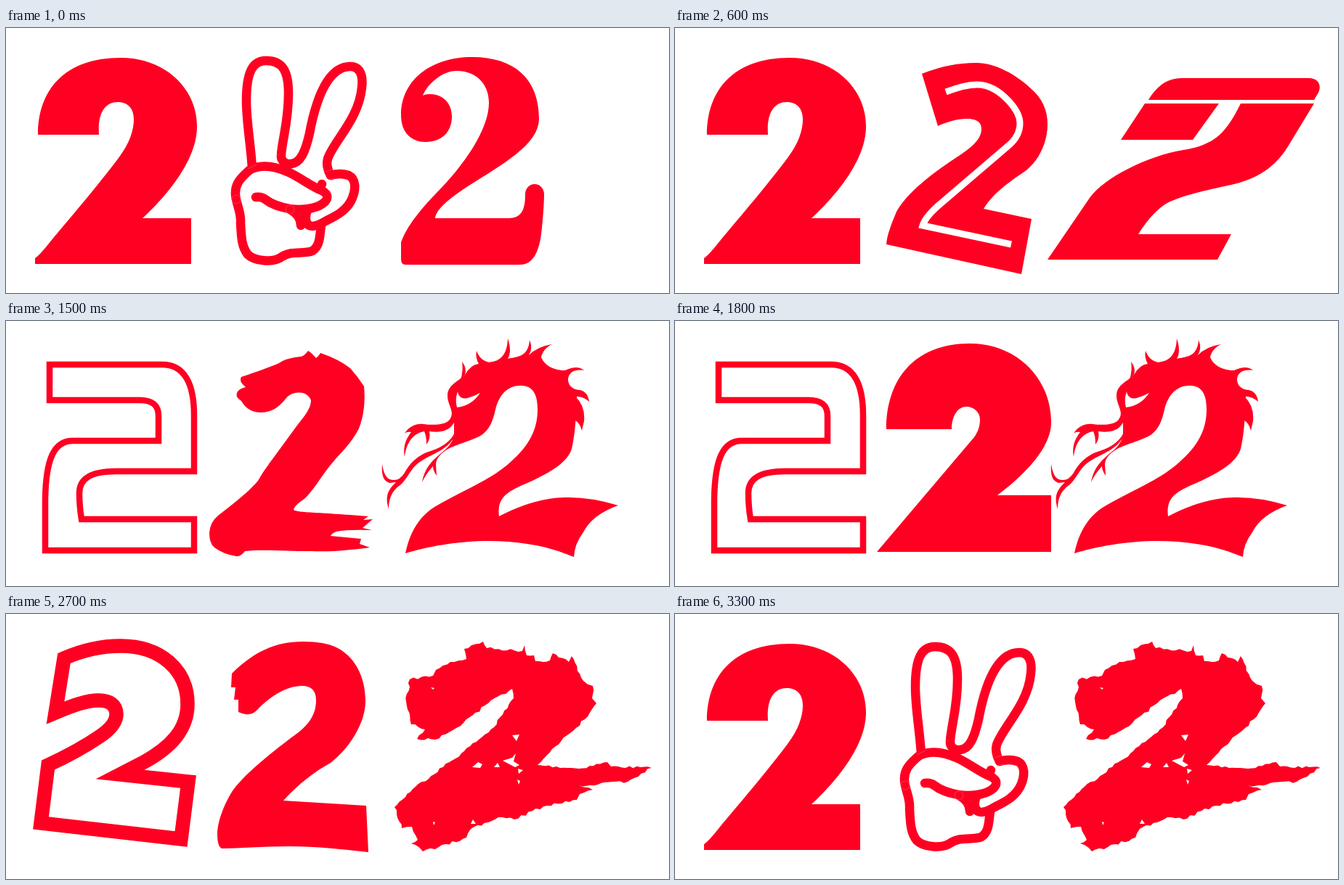
An HTML page that plays this animation: 913 by 365 pixels, repeating every 3.6 s.

```html
<!DOCTYPE html>
<html lang="en">
<head>
<meta charset="utf-8">
<title>2 2 2</title>
<style>
  html, body { margin: 0; width: 100%; height: 100%; overflow: hidden; background: #fff; }
  svg { display: block; width: 100%; height: 100%; fill: #ff0022; }
  .line { fill: none; stroke: #ff0022; }
  .gap { fill: #fff; }
  .gap-line { fill: none; stroke: #fff; }
  [data-from] { visibility: hidden; }
</style>
</head>
<body>
<svg viewBox="0 0 913 365">
  <!-- Left digit -->
  <g data-from="3000" data-for="1500">
    <path d="M44 147C44 86 80 41 158 41C218 41 263 82 263 136C263 175 233 220 188 262H255V325H40V317C48 312 60 295 72 281C100 248 130 212 155 179C170 159 176 141 176 126C176 111 168 102 154 102C137 102 126 116 128 147Z"/>
  </g>
  <g data-from="900" data-for="1200">
    <path class="line" stroke-width="8.5" d="M60 60H215C245 60 259 85 259 130V207H152C115 207 101 218 101 237Q101 255 104 273H259V316H54V245C55 190 66 165 92 165H210V131C210 116 202 109 184 109H60Z"/>
  </g>
  <g data-from="2100" data-for="900">
    <path class="line" stroke-width="19.5" d="M80 61C112 47 138 44 158 44C213 44 250 77 250 124C250 160 226 184 190 204L157 221L251 231L241 310L48 288L58 208C82 197 108 183 130 168C146 157 152 148 152 138C152 125 142 119 128 119C110 119 92 126 68 136Z"/>
  </g>

  <!-- Middle digit -->
  <g data-from="3300" data-for="600">
    <g class="line" stroke-width="12.5" stroke-linecap="round" stroke-linejoin="round">
      <path class="fingers" d="M339 193C337 160 331 130 331 100C331 60 340 45 358 45C380 45 389 58 389 90C389 130 380 155 379 175C378 184 386 188 393 187C405 186 412 172 418 145C425 108 440 53 474 53C488 53 492 66 490 82C486 125 452 155 443 180Q440 190 447 203"/>
      <path class="thumb" d="M447 203Q460 199 472 203C482 208 482 222 477 234C470 252 452 260 440 266C425 275 415 276 413 264Q412 256 416 250"/>
      <path class="palm" d="M317 236C312 215 325 205 335 196C350 187 370 190 390 199C405 206 420 218 435 224C445 229 444 236 436 242C425 250 405 251 390 249C375 246 366 243 357 236Q352 232 344 233M435 215L433 220M391 250Q406 258 406 272"/>
      <path class="wrist" d="M317 236C320 250 324 256 323 268C324 290 325 302 333 312C342 321 368 324 380 315C393 306 410 312 422 307C433 300 432 285 434 272"/>
    </g>
    <path class="gap-line" stroke-width=".6" opacity=".35" d="M333 194L345 188M440 198L452 194M440 209L453 207M311 236a6 6 0 1 0 12 0a6 6 0 1 0-12 0M385 250a6 6 0 1 0 12 0a6 6 0 1 0-12 0"/>
  </g>
  <g data-from="300" data-for="900">
    <path d="M340 63C365 53 390 48 415 48C440 48 470 63 495 88C507 100 513 115 513 133C513 155 503 180 485 195C470 206 440 224 425 249L491 263L477 339L291 298C292 285 298 270 305 253C320 226 355 200 385 180C405 167 422 155 422 139C422 128 413 125 401 125C390 125 375 129 362 135Z"/>
    <path class="gap-line" stroke-width="9" d="M373 88C390 82 402 78 416 78C432 78 447 87 460 101C470 112 475 121 475 131C475 145 468 155 458 163L368 240Q345 259 341 272L463 298"/>
  </g>
  <g data-from="1200" data-for="600">
    <path class="brush-top" d="M330 91Q320 83 324 77C345 70 365 63 376 58C388 50 400 50 406 49Q411 48 416 41Q421 44 427 51Q431 48 433 44Q459 53 474 65Q484 76 493 90C495 110 493 130 486 148C475 170 460 182 447 198L362 197L400 145C412 130 420 120 420 109C414 94 393 97 386 106C375 120 365 126 351 126Q333 126 324 110Q314 104 319 97Q322 93 330 91Z"/>
    <path class="brush-foot" d="M452 192L447 198C435 213 422 235 411 245Q397 254 396 260C400 264 425 263 499 269L492 274L505 273L491 285L504 288Q470 287 455 290Q449 292 447 296L489 300L487 307L501 312C470 316 450 318 420 317C390 317 350 314 329 317Q323 325 317 324Q299 321 287 312Q280 306 280 292Q281 277 292 268C310 254 335 235 347 220Q353 209 362 197L366 192Z"/>
  </g>
  <g data-from="1800" data-for="600">
    <path d="M291 149C291 80 330 31 406 31C470 31 518 78 518 140C518 170 490 205 444 240H518V318H278L412 160C418 152 420 143 420 136C420 125 411 118 401 118C390 118 381 130 381 149Z"/>
  </g>
  <g data-from="2400" data-for="900">
    <path d="M311 82C340 53 370 38 409 38Q439 38 455 46C483 60 495 90 495 120C495 150 473 185 447 205C425 217 403 234 382 257L496 264L499 328C460 324 430 320 390 320C350 320 320 323 297 323Q291 320 291 303C291 290 297 268 311 245C325 224 360 195 396 168C415 155 427 140 427 119C427 105 420 99 408 99C385 99 362 115 345 133C338 140 329 139 320 135V118H314L316 101H310Z"/>
  </g>

  <!-- Right digit -->
  <g data-from="0" data-for="600">
    <path d="M574 93C580 78 600 59 621 59C645 59 665 75 665 103C665 140 630 190 592 228C570 251 552 273 544 295V318Q544 326 550 326H708C725 326 735 310 738 275Q741 245 741 229C741 221 735 215 728 215C721 215 715 221 715 229C715 250 710 262 692 262H591C592 250 610 235 636 218C685 187 734 160 734 125C734 70 700 40 642 40C585 40 544 72 544 120C544 144 558 157 578 157C600 157 614 143 614 122C614 102 600 91 584 91Q577 91 574 93Z"/>
  </g>
  <g data-from="600" data-for="900">
    <path class="bar" d="M652 99C662 83 675 69 698 69H873C885 69 891 78 886 89L880 99ZM647 104H749L713 154H614Z"/>
    <path class="stem" d="M779 104H880L846 160C831 186 808 206 770 215C735 223 700 230 678 241C662 250 648 268 638 284H766L747 319H513L571 234C590 207 650 176 700 168C745 161 760 142 779 104Z"/>
  </g>
  <g data-from="1500" data-for="1200">
    <path class="body" d="M550 320C556 290 570 268 592 255C640 228 670 217 695 194C720 172 732 150 732 122C732 100 725 89 709 89L700 60H740L786 104Q785 150 779 176C773 195 750 208 725 220C695 233 675 240 679 269C710 253 740 243 775 243Q807 243 843 254C820 262 803 275 795 291Q783 307 782 325C750 311 710 303 665 303C620 303 580 311 550 320Z"/>
    <path class="mane" d="M720 47Q732 35 752 32C740 38 738 46 737 50C742 62 755 68 770 68Q787 60 796 68C784 66 775 70 774 80C774 92 785 95 790 95Q801 97 803 111Q794 103 784 104Q798 117 796 138L793 151Q790 140 784 137L745 110L720 75Z"/>
    <path class="head" d="M709 89C690 89 679 102 674 122C670 140 665 150 655 157C645 163 630 167 613 174L617 159V140L612 134C618 125 608 115 608 103C608 88 622 84 632 74Q640 60 651 59L666 57L691 52L720 47V88Z"/>
    <path class="horns" d="M626 81Q630 68 628 56Q635 65 632 74ZM651 59Q646 50 648 41Q653 55 666 57C680 55 690 48 691 24Q697 42 691 52Q700 51 708 48Q720 43 721 26Q726 38 720 47L700 60H650Z"/>
    <path class="lip" d="M617 140C610 152 598 154 583 152Q585 162 579 170Q579 158 576 152C565 154 552 162 549 187C546 170 553 160 558 153Q552 152 549 155C555 145 565 141 575 142C590 144 608 143 612 134L620 132Z"/>
    <path class="beard" d="M622 170L613 174Q593 184 592 197L593 213Q588 206 588 200Q578 211 573 222C577 200 590 190 598 183Q613 172 617 159Z"/>
    <path class="tongue" d="M618 153C613 166 600 174 585 179C565 185 555 198 549 209Q542 220 533 219C524 219 520 210 518 197C517 212 519 220 528 223L537 222C527 232 521 240 527 259C527 245 531 236 540 228C550 222 555 208 563 200C575 187 600 182 612 167L618 160Z"/>
    <path class="gap" d="M622 97C623 105 629 108 636 106Q644 104 653 99Q641 117 621 119Q618 108 622 97Z"/>
  </g>
  <g data-from="2700" data-for="900">
    <polygon id="rough" points="556,90 588,85 592,77 612,66 634,62 631,48 657,38 662,47 711,51 714,43 717,57 727,57 729,65 749,64 753,54 775,66 779,58 795,92 808,99 807,116 813,123 797,145 777,164 752,186 732,208 789,213 828,204 833,210 889,212 856,231 789,236 808,242 790,248 786,256 740,265 700,283 678,280 640,296 634,308 596,321 574,327 558,316 567,311 559,293 545,295 535,266 560,241 627,192 672,156 699,116 697,103 664,123 630,150 600,167 591,173 566,172 577,159 558,152 551,121"/>
    <path class="gap" d="M697 167L707 166L703 175ZM642 211L650 204L656 207L653 212ZM672 211L677 205L680 211ZM684 202L697 198L702 192L699 203L707 208L701 211ZM705 213L712 215L706 220ZM704 228L708 230L706 235ZM640 289L643 283L647 289ZM588 286L591 287L589 291ZM585 101L590 102L588 104Z"/>
  </g>
</svg>
<script>
  const LOOP = 3600;

  // Breaks each long edge into short, randomly displaced pieces.
  function roughen(polygon, step, depth) {
    let seed = 7;
    const jitter = () => {
      seed = (seed * 16807) % 2147483647;
      return (seed / 2147483647 - 0.5) * 2 * depth;
    };
    const corners = [...polygon.points];
    const result = corners.flatMap((a, i) => {
      const b = corners[(i + 1) % corners.length];
      const dx = b.x - a.x, dy = b.y - a.y;
      const length = Math.hypot(dx, dy);
      const pieces = Math.max(1, Math.floor(length / step));
      return Array.from({ length: pieces }, (_, k) => {
        const offset = k ? jitter() / length : 0;
        const x = a.x + dx * k / pieces - dy * offset;
        const y = a.y + dy * k / pieces + dx * offset;
        return `${x.toFixed(1)},${y.toFixed(1)}`;
      });
    });
    polygon.setAttribute("points", result.join(" "));
  }

  roughen(document.getElementById("rough"), 5, 1.8);

  const digits = [...document.querySelectorAll("[data-from]")].map(node => ({
    node, from: +node.dataset.from, span: +node.dataset.for
  }));

  function draw(now) {
    for (const { node, from, span } of digits) {
      const age = (now % LOOP - from + LOOP) % LOOP;
      node.style.visibility = age < span ? "visible" : "hidden";
    }
    requestAnimationFrame(draw);
  }
  draw(0);
</script>
</body>
</html>
```
